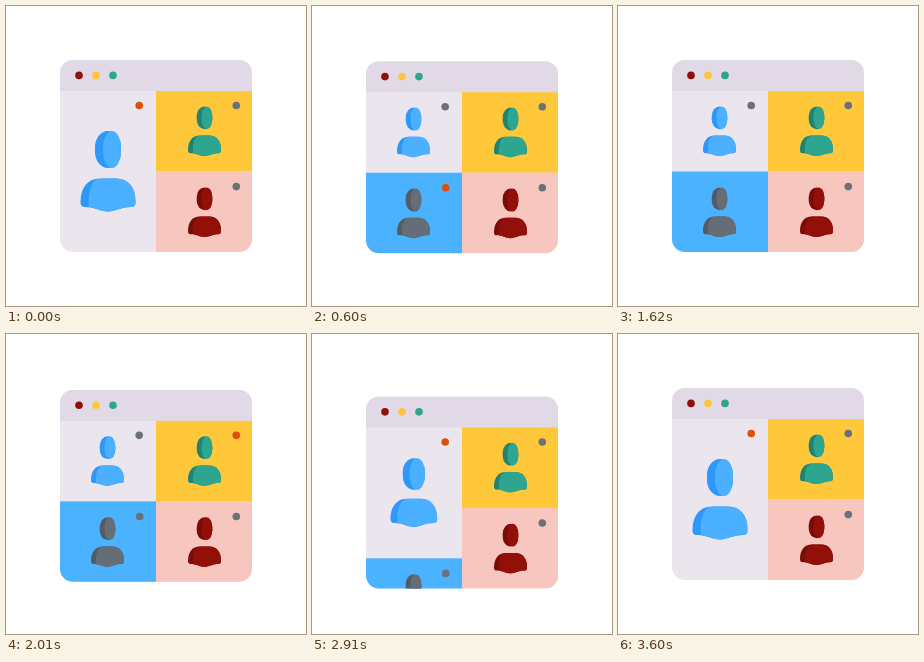
Recreate the animation shown at these times as an HTML page. Size 300 by 300 pixels, loop 3.63 s.

```html
<!DOCTYPE html>
<html lang="en">
<head>
<meta charset="utf-8">
<title>Video call</title>
<style>
  html, body { margin: 0; width: 100%; height: 100%; overflow: hidden; background: #fff; }
  svg { display: block; width: 100%; height: 100%; }
</style>
</head>
<body>
<svg viewBox="0 0 300 300">
  <defs>
    <clipPath id="frame"><rect x="54" y="54" width="192" height="192" rx="13"/></clipPath>
    <!-- Figure centred on the origin: "color" is the shade, "fill" the lit side -->
    <g id="person">
      <g fill="currentColor">
        <rect x="-13" y="-40" width="26" height="37" rx="13" ry="16"/>
        <path d="M-27.5 30C-27 16-20 7.5-8 7.5H8C20 7.5 27.5 16 27.5 30Q28 36 23 36C12 36 8 40.5 0 40.5S-12 36-23 36Q-28 36-27.5 30Z"/>
      </g>
      <rect x="-5" y="-40" width="18" height="37" rx="9" ry="16"/>
      <path d="M-19 36.3C-20.500 22-17 7.500-7 7.500H8C20 7.500 27.500 16 27.500 30Q28 36 23 36C12 36 8 40.500 0 40.500C-8 40.500-11 37-19 36.300Z"/>
    </g>
  </defs>
  <g id="window">
    <g clip-path="url(#frame)">
      <rect x="54" y="54" width="192" height="192" fill="#ebe6ee"/>
      <rect x="54" y="54" width="192" height="31" fill="#e1dae6"/>
      <circle cx="73" cy="69.400" r="3.800" fill="#8f0f09"/>
      <circle cx="90" cy="69.400" r="3.800" fill="#ffc53a"/>
      <circle cx="107" cy="69.400" r="3.800" fill="#2da58f"/>

      <use id="host" href="#person" fill="#4ab0ff" color="#2e97fa"/>
      <circle id="hostDot" cx="133.200" cy="99.500" r="3.800"/>

      <g id="guest">
        <rect x="54" y="165.500" width="97" height="82" fill="#4ab2ff"/>
        <use href="#person" fill="#656d77" color="#535b65" transform="translate(101.500 206) scale(.6 .615)"/>
        <circle id="guestDot" cx="133.700" cy="180.600" r="3.800"/>
      </g>

      <rect x="150" y="85" width="96" height="80.500" fill="#ffc73a"/>
      <use href="#person" fill="#2da58f" color="#1f8272" transform="translate(198.500 125) scale(.6 .615)"/>
      <circle id="yellowDot" cx="230.300" cy="99.500" r="3.800"/>

      <rect x="150" y="165.500" width="96" height="81" fill="#f7c7bf"/>
      <use href="#person" fill="#930f0a" color="#7a0c07" transform="translate(198.500 206) scale(.6 .615)"/>
      <circle cx="230.300" cy="180.600" r="3.800" fill="#6b7179"/>
    </g>
  </g>
</svg>
<script>
const LOOP = 3630, OPEN = 0, SWITCH = 1700, CLOSE = 2690, SLIDE = 600;
const ACTIVE = '#e04e0a', IDLE = '#6b7179';
const el = id => document.getElementById(id);
const clamp = x => Math.min(1, Math.max(0, x));
const mix = (a, b, k) => a + (b - a) * k;

// cubic-bezier(.45, 0, .08, 1)
function ease(x) {
  let low = 0, high = 1;
  for (let i = 0; i < 24; i++) {
    const s = (low + high) / 2, r = 1 - s;
    if (3 * r * r * s * .45 + 3 * r * s * s * .08 + s ** 3 < x) low = s; else high = s;
  }
  return low * low * (3 - 2 * low);
}

// Quick dip followed by a slower return
function dip(t) {
  const peak = 285, end = 780;
  if (t <= 0 || t >= end) return 0;
  return t < peak
    ? Math.sin(Math.PI / 2 * t / peak) ** 2
    : Math.cos(Math.PI / 2 * ((t - peak) / (end - peak)) ** .6) ** 2;
}

function draw(t) {
  const split = ease(clamp((t - OPEN) / SLIDE)) - ease(clamp((t - CLOSE) / SLIDE));
  const drop = 9.3 * dip(t - OPEN) + 2 * dip(t - SWITCH) + 9.6 * dip(t - CLOSE);
  el('window').setAttribute('transform', `translate(0 ${drop})`);
  el('guest').setAttribute('transform', `translate(0 ${mix(81, 0, split)})`);
  el('host').setAttribute('transform',
    `translate(${mix(102, 101.5, split)} ${mix(165, 125, split)}) scale(${mix(1, .6, split)} ${mix(1, .615, split)})`);

  const speaker = t < 120 || t >= CLOSE + 120 ? 'host' : t < SWITCH ? 'guest' : 'yellow';
  for (const name of ['host', 'guest', 'yellow'])
    el(name + 'Dot').setAttribute('fill', name === speaker ? ACTIVE : IDLE);
  el('guestDot').setAttribute('opacity', t >= 1600 && t < SWITCH ? 0 : 1);
}

function tick() {
  draw(performance.now() % LOOP);
  requestAnimationFrame(tick);
}
tick();
</script>
</body>
</html>
```
